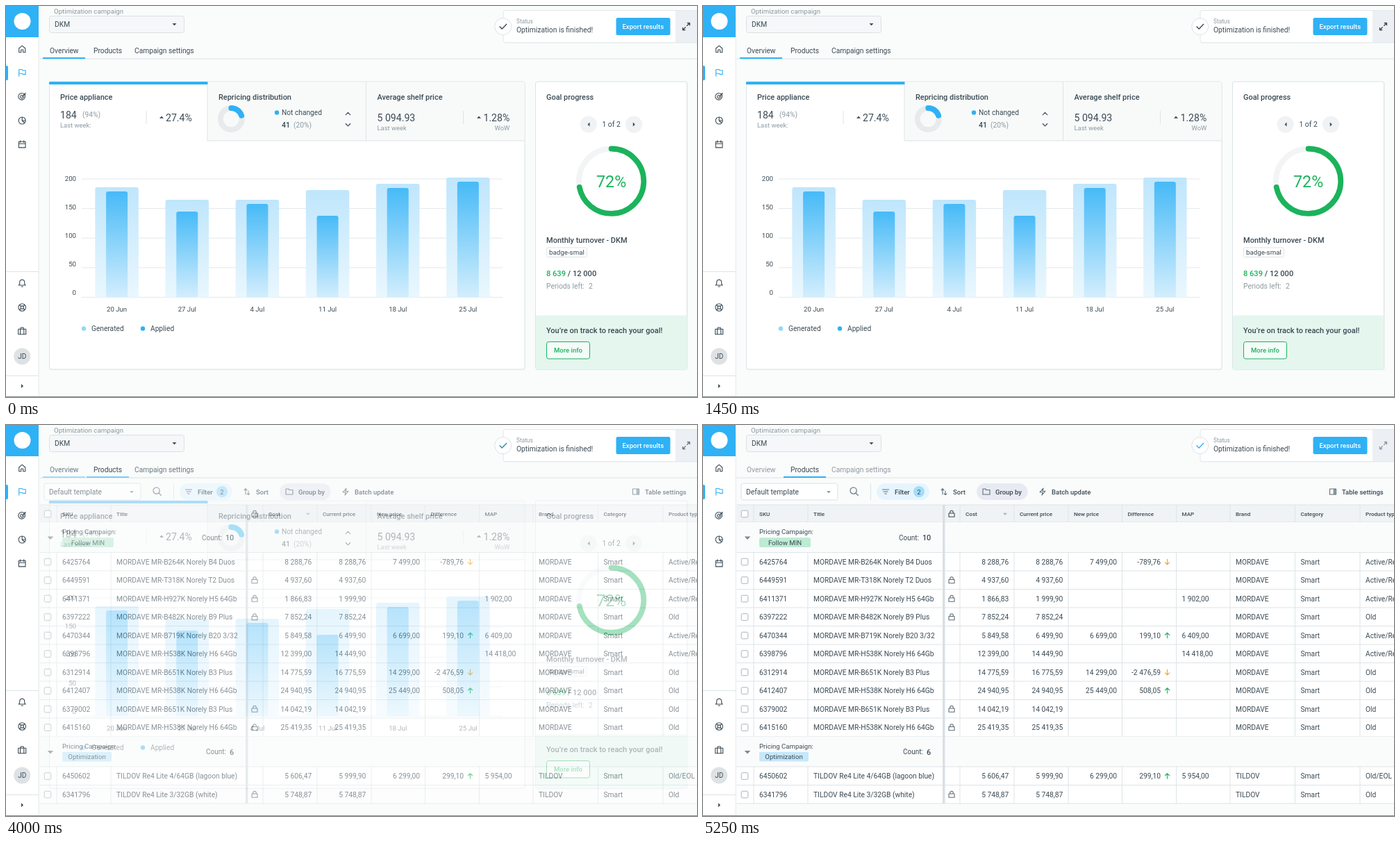
An HTML page that plays this animation: 995x563 px, repeating every 8000 ms.

```html
<!DOCTYPE html>
<html lang="en">
<head>
<meta charset="utf-8">
<title>Pricing dashboard</title>
<style>
html, body { margin: 0; height: 100%; overflow: hidden; background: #fafcfc; }
svg { display: block; width: 100vw; height: 100vh; font-family: Roboto, sans-serif; }
</style>
</head>
<body>
<svg id="stage" viewBox="0 0 995 563"></svg>
<script>
const INK = '#3b4a54', GRAY = '#8d9aa2', BLUE = '#2fb1f5', GREEN = '#1bb35c', LINE = '#dde4e7', PAGE = '#fafcfc';

// Text is placed by the middle of its capitals.
const text = (x, cy, str, size = 10.25, fill = INK, weight = 400, anchor = 'start') =>
  `<text x="${x}" y="${cy + size * 0.355}" font-size="${size}" fill="${fill}" font-weight="${weight}" text-anchor="${anchor}">${str}</text>`;
const mid = (x, cy, str, size, fill, weight) => text(x, cy, str, size, fill, weight, 'middle');
const end = (x, cy, str, size, fill, weight) => text(x, cy, str, size, fill, weight, 'end');
const rect = (x, y, w, h, fill, r = 0, stroke = 'none') =>
  `<rect x="${x}" y="${y}" width="${w}" height="${h}" rx="${r}" fill="${fill}" stroke="${stroke}"/>`;
const circle = (x, y, r, fill, stroke = 'none', width = 1) =>
  `<circle cx="${x}" cy="${y}" r="${r}" fill="${fill}" stroke="${stroke}" stroke-width="${width}"/>`;
const hline = (x, y, w, fill = LINE, h = 1) => rect(x, y, w, h, fill);
const vline = (x, y, h, fill = LINE) => rect(x, y, 1, h, fill);
const shape = (x, y, d, fill = INK) => `<path transform="translate(${x} ${y})" d="${d}" fill="${fill}"/>`;
const icon = (x, y, d, color = INK, width = 1.1) =>
  `<path transform="translate(${x} ${y})" d="${d}" fill="none" stroke="${color}" stroke-width="${width}" stroke-linecap="round" stroke-linejoin="round"/>`;
const arc = (x, y, r, width, share, color) =>
  `<circle cx="${x}" cy="${y}" r="${r}" fill="none" stroke="${color}" stroke-width="${width}" stroke-linecap="round" pathLength="100" stroke-dasharray="${share} 100" transform="rotate(-90 ${x} ${y})"/>`;
const ringPath = r => `M${-r} 0a${r} ${r} 0 1 0 ${2 * r} 0a${r} ${r} 0 1 0 ${-2 * r} 0`;

const DOWN = 'M-3 -1.5h6l-3 3.2z', UP = 'M-3 1.5h6l-3 -3.2z', LEFT = 'M1.5 -3v6l-3 -3z', RIGHT = 'M-1.5 -3v6l3 -3z';
const LOCK = 'M-4 -1h8v5.2h-8zM-2.2 -1v-1.6a2.2 2.2 0 0 1 4.4 0v1.6';

const sideIcons = [
  [62, 'M-4.5 -1L0 -4.8L4.5 -1V4.8H1.5V1H-1.5V4.8H-4.5z'],
  [96, 'M-4.5 5V-4.5H0L.7 -3.2H5V2.4H1L.2 1.2H-4.5'],
  [130.5, 'M3.8 -2A4.8 4.8 0 1 1 1.2 -4.6M2 -.5A2.3 2.3 0 1 1 0 -2.2M0 0L5 -5M2.5 -2.5V-4.6M2.5 -2.5H4.8'],
  [165, ringPath(5) + 'M0 -5V0H5M0 0L3.5 3.5'],
  [199, 'M-4.8 -3.7h9.6v8.6h-9.6zM-4.8 -.8h9.6M-2.5 -5.2v2.6M2.5 -5.2v2.6'],
  [399, 'M-5 3H5L3.5 1.2V-1.2A3.5 3.5 0 0 0 -3.5 -1.2V1.2zM-1.2 5H1.2M0 -4.7V-5.4'],
  [434, ringPath(5.3) + ringPath(2.1) + 'M-3.7 -3.7l2.2 2.2M3.7 -3.7l-2.2 2.2M-3.7 3.7l2.2 -2.2M3.7 3.7l-2.2 -2.2'],
  [468, 'M-5.5 -2.8h11v7.5h-11zM-2 -2.8v-2.2h4v2.2M-2.6 -2.8v7.5M2.6 -2.8v7.5']
];

function sidebar() {
  return rect(0, 0, 47, 563, '#fff') + vline(46.5, 45, 518, '#e3e9eb') + vline(47.5, 45, 518, '#f2f5f6') +
    rect(0, 0, 47, 45, BLUE) + circle(23.5, 22, 12, '#fff') + rect(-3, 86, 6, 21, BLUE, 2) +
    sideIcons.map(([y, d], i) => icon(23.2, y, d, i === 1 ? BLUE : INK)).join('') +
    hline(0, 382, 47) + circle(23.2, 504.5, 12, '#dee2e5') + mid(23.2, 504.7, 'JD', 10) +
    hline(0, 532, 47) + shape(23.5, 547.3, RIGHT);
}

function header(active, tabColors, checkColor, expandColor) {
  const tabs = [['Overview', 63, 53, 61], ['Products', 126, 116, 61], ['Campaign settings', 185]];
  const [, , barX, barW] = tabs[active];
  return text(69, 7.5, 'Optimization campaign', 9.7, '#87959d') +
    rect(62.5, 14.5, 194, 24, '#f5f7f8', 3, '#dbe1e4') + text(70, 26.7, 'DKM') + shape(242.5, 26.6, DOWN) +
    tabs.map(([label, x], i) => text(x, 64, label, 10.25, tabColors[i])).join('') +
    hline(47, 75.5, 948) + hline(barX, 74, barW, BLUE, 2) +
    rect(716, 6.5, 290, 46, '#fff', 3, '#e1e7ea') + hline(717, 52.5, 278, '#e9eef0') +
    rect(964, 7, 31, 45, '#eceff3') +
    circle(715.7, 29.5, 12, '#fff', '#dbe2e6') + icon(715.7, 29.5, 'M-4.7 .3L-1.5 3.5L5 -3.2', checkColor, 1.4) +
    text(735, 22.3, 'Status', 8.3, GRAY) + text(735, 34.3, 'Optimization is finished!', 10.3) +
    rect(878.5, 17, 78, 25, BLUE, 2.5) + mid(917.3, 29.7, 'Export results', 9.65, '#fff', 500) +
    icon(979.5, 29.5, 'M1.2 -1.2L5 -5M1.8 -5H5V-1.8M-1.2 1.2L-5 5M-5 1.8V5H-1.8', expandColor, 1.3);
}

function chart() {
  const bars = [[261, 267], [279, 296], [279, 285], [265, 302], [256, 262], [247, 253]];
  const days = ['20 Jun', '27 Jul', '4 Jul', '11 Jul', '18 Jul', '25 Jul'];
  const bar = (cx, top, w, fill) =>
    `<path d="M${cx - w / 2} 419.5V${top + 3}q0 -3 3 -3h${w - 6}q3 0 3 3V419.5z" fill="url(#${fill})"/>`;
  let out = '';
  for (let i = 0; i < 5; i++)
    out += hline(109, 248.5 + 42.6 * i, 606, '#e3e8eb') + end(101, 249 + 41 * i, 200 - 50 * i, 9.6);
  bars.forEach(([generated, applied], i) => {
    const cx = 159.6 + 101.15 * i;
    out += bar(cx, generated, 62.5, 'generated') + bar(cx, applied, 31, 'applied') + mid(cx, 437, days[i], 9.6);
  });
  return out + circle(112, 464.5, 3.2, '#94d7f9') + text(123, 464.7, 'Generated', 10.2) +
    circle(197, 464.5, 3.2, BLUE) + text(208, 464.7, 'Applied', 10.2);
}

function summary() {
  return rect(62, 108.5, 686, 416, '#eef2f3', 4) + rect(62.5, 109, 684.5, 414, '#fff', 3, LINE) +
    rect(290, 109.5, 456.5, 84.5, '#f8fafa') + hline(290, 193.5, 457) + vline(289.5, 109, 85) + vline(518, 109, 85) +
    rect(62, 109, 228.5, 4, BLUE, 1) +
    text(78, 131, 'Price appliance', 10.95, INK, 500) + text(78, 156.7, '184', 14.1) +
    text(110, 156.7, '(94%)', 10.2, GRAY) + text(78, 171.3, 'Last week:', 9.45, GRAY) +
    vline(201.5, 151, 19) + shape(224, 160.3, UP) + text(230, 160.5, '27.4%', 14.1) +
    text(306, 131, 'Repricing distribution', 10.95, INK, 500) +
    circle(324.3, 162.5, 15.5, 'none', '#e8ebec', 8) + arc(324.3, 162.5, 15.5, 8, 20, BLUE) +
    circle(390, 153.5, 3.2, BLUE) + text(397, 153.7, 'Not changed', 10.2) +
    text(397, 171.5, '41', 10.6, INK, 500) + text(414, 171.5, '(20%)', 10.2, GRAY) +
    icon(492.5, 155, 'M-3.2 1.7L0 -1.7L3.2 1.7', INK, 1.2) + icon(492.5, 171.2, 'M-3.2 -1.7L0 1.7L3.2 -1.7', INK, 1.2) +
    text(534.5, 131, 'Average shelf price', 10.95, INK, 500) + text(534.5, 160.5, '5 094.93', 14.1) +
    text(534.5, 175.3, 'Last week', 9.45, GRAY) + vline(658, 151, 19) +
    shape(681, 160.3, UP) + end(725.3, 160.5, '1.28%', 14.1) + end(725.3, 175.3, 'WoW', 9.4, GRAY);
}

function goal() {
  const pager = (x, d) => circle(x, 170.5, 12, '#f0f2f4') + shape(x + .3, 170.5, d);
  return rect(762, 108.5, 220, 416, '#eef2f3', 4) + rect(762.5, 109, 218, 414, '#fff', 3, LINE) +
    rect(763, 445.5, 217.5, 77.5, '#e4f6ee', 2) + text(778, 131, 'Goal progress', 10.95, INK, 500) +
    pager(838.7, LEFT) + pager(904, RIGHT) + mid(871.6, 170.7, '1 of 2', 10.4) +
    circle(871.6, 252.2, 46.7, 'none', '#f2f4f5', 7.8) + arc(871.6, 252.2, 46.7, 7.8, 72, GREEN) +
    mid(871.6, 252.5, '72%', 23.3, GREEN) +
    text(778, 337.5, 'Monthly turnover - DKM', 11, INK, 500) +
    rect(778.5, 348, 58, 13.5, '#fff', 2, LINE) + text(782, 355, 'badge-smal', 9.75) +
    text(778, 385, `<tspan fill="${GREEN}">8 639</tspan> / 12 000`, 11.1, INK, 500) +
    text(778, 403, 'Periods left:', 10.3, GRAY) + text(839, 403, '2', 10.3, GRAY) +
    text(778, 467.5, 'You’re on track to reach your goal!', 11, INK, 500) +
    rect(778.5, 483.5, 62, 24.5, '#f4fbf8', 3, GREEN) + mid(809.5, 496, 'More info', 9.5, GREEN, 500);
}

function toolbar() {
  const label = (x, str) => text(x, 96.3, str, 9.5, INK, 500);
  return rect(55, 84, 139, 24, '#fff', 3, '#dbe1e4') + text(62, 96.5, 'Default template', 10.3) +
    shape(181, 96.5, DOWN, GRAY) + icon(217, 95.5, 'M-5 -1a4.6 4.6 0 1 0 9.2 0a4.6 4.6 0 1 0 -9.2 0M3 2.5L6.3 5.8', '#6f7f89', 1.3) +
    vline(241, 84, 24) + rect(250, 84, 76, 24, '#e6f5fd', 12) +
    icon(263, 96, 'M-4.5 -3h9M-3 0h6M-1.2 3h2.4', '#5d6d77') + label(276, 'Filter') +
    circle(311, 96, 8, '#a5dcfa') + mid(311, 96.3, '2', 9.5) +
    icon(347, 96, 'M-2 4V-4.2M-4 -2.2L-2 -4.4L0 -2.2M2 -1V4.4M0.3 2.8L2 4.5L3.8 2.8', '#5d6d77') + label(360, 'Sort') +
    rect(394, 84, 73.5, 24, '#e8eaf3', 12) +
    icon(408, 96, 'M-5 4V-4h3.6l1.4 1.5h5V4z', '#5d6d77') + label(421, 'Group by') +
    icon(489, 96, 'M1 -5L-4 .8H0L-1 5L4 -.8H0z', '#5d6d77') + label(502, 'Batch update') +
    icon(907, 96, 'M-4.5 -4h9v8h-9zM1.5 -4v8M3 -4v8', '#5d6d77') + label(920, 'Table settings');
}

// sku | title | locked | cost | current price | new price | difference | map | type
const M = 'MORDAVE', T = 'TILDOV', A = 'Active/Reg';
const firstGroup = [
  `6425764|${M} MR-B264K Norely B4 Duos||8 288,76|8 288,76|7 499,00|-789,76||${A}`,
  `6449591|${M} MR-T318K Norely T2 Duos|1|4 937,60|4 937,60||||${A}`,
  `6411371|${M} MR-H927K Norely H5 64Gb|1|1 866,83|1 999,90|||1 902,00|${A}`,
  `6397222|${M} MR-B482K Norely B9 Plus|1|7 852,24|7 852,24||||Old`,
  `6470344|${M} MR-B719K Norely B20 3/32||5 849,58|6 499,90|6 699,00|199,10|6 409,00|${A}`,
  `6398796|${M} MR-H538K Norely H6 64Gb||12 399,00|14 449,90|||14 418,00|${A}`,
  `6312914|${M} MR-B651K Norely B3 Plus||14 775,59|16 775,59|14 299,00|-2 476,59||Old`,
  `6412407|${M} MR-H538K Norely H6 64Gb||24 940,95|24 940,95|25 449,00|508,05||Old`,
  `6379002|${M} MR-B651K Norely B3 Plus|1|14 042,19|14 042,19||||Old`,
  `6415160|${M} MR-H538K Norely H6 64Gb|1|25 419,35|25 419,35||||Old`
];
const secondGroup = [
  `6450602|${T} Re4 Lite 4/64GB (lagoon blue)||5 606,47|5 999,90|6 299,00|299,10|5 954,00|Old/EOL`,
  `6341796|${T} Re4 Lite 3/32GB (white)|1|5 748,87|5 748,87||||Old`
];
const ROW = 26.5;
const columns = [72.5, 150.5, 369.5, 447.5, 525.5, 603, 681, 758.5, 852, 945.5];
const grid = (y, h) => columns.map(x => vline(x, y, h)).join('');
const checkbox = y => rect(55.2, y - 4.8, 9.6, 9.6, '#fff', 1.5, '#a9b5bc');

function rows(top, list) {
  let out = rect(48, top, 947, ROW * list.length, '#fff') + grid(top, ROW * list.length) + hline(48, top - .5, 947);
  list.forEach((line, i) => {
    const [sku, title, locked, cost, price, next, diff, map, type] = line.split('|');
    const y = top + ROW * (i + .5) + .3;
    out += hline(48, top + ROW * (i + 1) - .5, 947) + checkbox(y) + text(81, y, sku) + text(159, y, title) +
      (locked ? icon(358, y, LOCK, '#5d6d77') : '') +
      end(440.3, y, cost) + end(518.3, y, price) + end(596, y, next) + end(659, y, diff) +
      text(689.5, y, map) + text(767, y, title.split(' ')[0]) + text(860.5, y, 'Smart') + text(954, y, type);
    if (diff) out += diff[0] === '-'
      ? icon(668.5, y, 'M0 -3.7V3.7M-3 .8L0 3.8L3 .8', '#f5a32a', 1.2)
      : icon(668.5, y, 'M0 3.7V-3.7M-3 -.8L0 -3.8L3 -.8', '#27b768', 1.2);
  });
  return out;
}

function group(y, tag, tagWidth, tagColor, count, countX) {
  return rect(48, y, 947, 43.5, '#fafcfc') + shape(64, y + 22.5, 'M-4.3 -2h8.6l-4.3 4.5z', '#7b8991') +
    text(81, y + 13.8, 'Pricing Campaign:', 9.6) + rect(81, y + 22.3, tagWidth, 13.7, tagColor, 2) +
    mid(81 + tagWidth / 2, y + 29.3, tag, 9.6) + text(countX, y + 22, 'Count:', 10) + end(328.3, y + 22.2, count, 10.9, INK, 500);
}

function table() {
  const titles = [[81, 'SKU'], [159, 'Title'], [378, 'Cost'], [456, 'Current price'], [534, 'New price'],
    [611.5, 'Difference'], [689.5, 'MAP'], [767, 'Brand'], [860.5, 'Category'], [954, 'Product type']];
  return rect(48, 115, 947, 25, '#eff3f5') + grid(115, 25) + hline(48, 114.5, 947) + hline(48, 139.5, 947) +
    checkbox(128) + icon(358, 128, LOCK) + shape(435, 128.3, DOWN, '#a9b5bc') +
    titles.map(([x, str]) => text(x, 128.3, str, 8.1, INK, 500)).join('') +
    group(140, 'Follow MIN', 74, '#bdebd3', 10, 282) + rows(183.5, firstGroup) +
    group(448.5, 'Optimization', 71, '#c5e8fb', 6, 288) + rows(492, secondGroup) +
    rect(345, 115, 3.5, 430, '#d9e0e3');
}

const stage = document.getElementById('stage');
const gradient = (id, from, to) =>
  `<linearGradient id="${id}" x2="0" y2="1"><stop stop-color="${from}"/><stop offset="1" stop-color="${to}"/></linearGradient>`;
const base = rect(0, 0, 995, 563, PAGE);
const footer = hline(0, 562, 995, '#8b9092');
stage.innerHTML = `<defs>${gradient('generated', '#bfe6fc', '#eaf7fe')}${gradient('applied', '#47baf7', '#d3eefd')}</defs>
  <g>${base + header(0, [INK, INK, INK], INK, INK) + summary() + chart() + goal() + sidebar() + footer}</g>
  <g id="products">${base + header(1, [GRAY, INK, GRAY], BLUE, GRAY) + toolbar() + table() + sidebar() + footer}</g>`;

const products = document.getElementById('products');
const LOOP = 8000, STEP = 50, FADE_START = 3900, FADE_LENGTH = 400;

function draw() {
  const time = Math.floor(performance.now() % LOOP / STEP) * STEP;
  const t = Math.min(1, Math.max(0, (time - FADE_START) / FADE_LENGTH));
  products.setAttribute('opacity', 1 - (1 - t ** 1.6) ** 8);
  requestAnimationFrame(draw);
}
draw();
</script>
</body>
</html>
```
